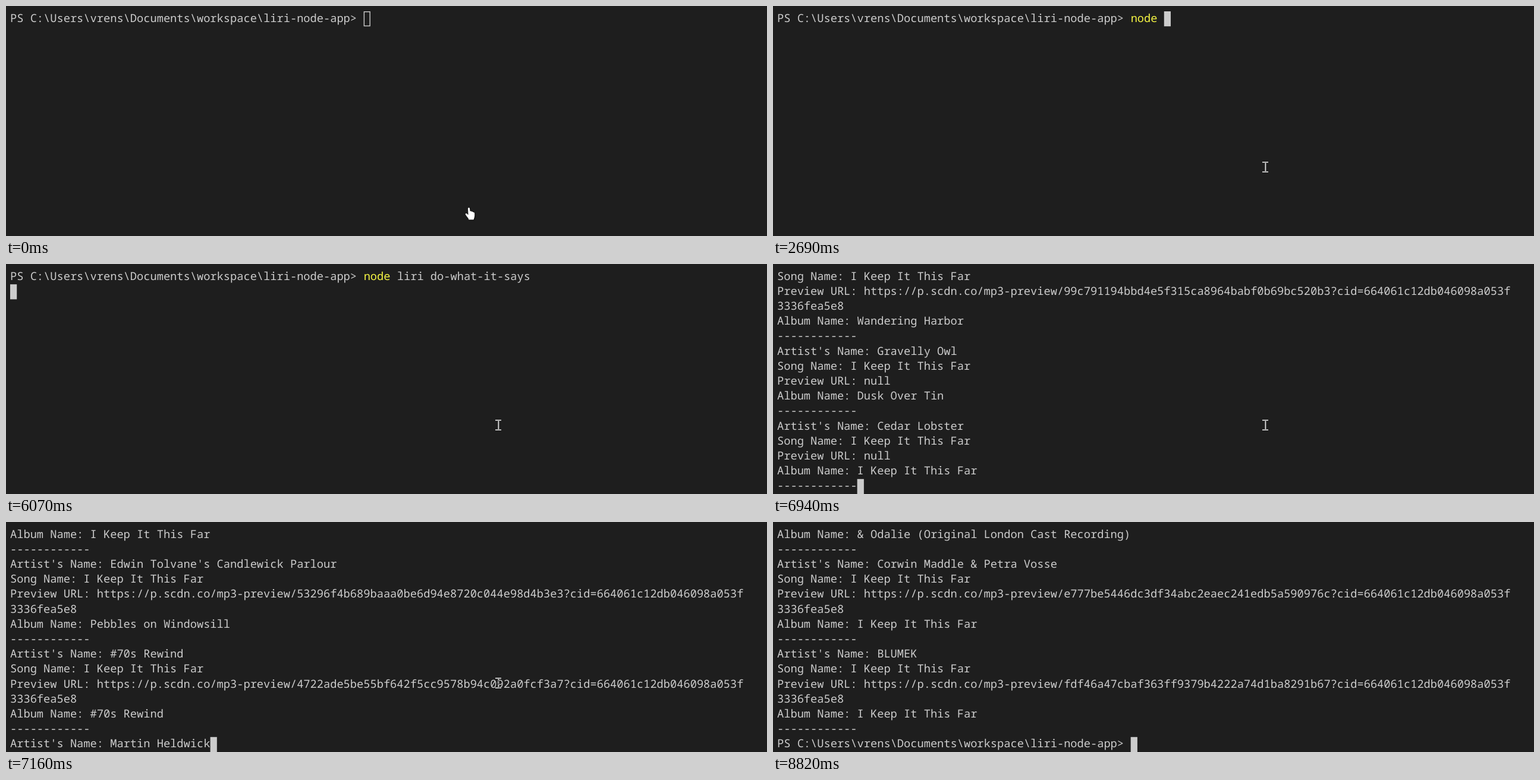
Recreate the animation shown at these times as an HTML page with a canvas. Size 1280x387 px, loop 9.36 s.

```html
<!DOCTYPE html>
<html lang="en">
<head>
<meta charset="utf-8">
<title>Terminal session</title>
<style>
  html, body { margin: 0; width: 100%; height: 100%; overflow: hidden; background: #1e1e1e; }
  canvas { display: block; }
</style>
</head>
<body>
<canvas id="stage" width="1280" height="387"></canvas>
<script>
const ctx = document.getElementById('stage').getContext('2d');
const LOOP = 9360, ROWS = 15, COLUMNS = 110;
const FONT_SIZE = 18.7, CELL = FONT_SIZE * 0.6;
const LEFT = 7, TOP = 9, ROW = 25.2, BASELINE = 17.5;
const FOREGROUND = '#cccccc', YELLOW = '#f5f543';

const PROMPT = 'PS C:\\Users\\vrens\\Documents\\workspace\\liri-node-app> ';
const COMMAND = 'node liri do-what-it-says';
const SONG = 'I Keep It This Far';
const ARTIST = "Artist's Name: ";

// artist, preview id, album
const tracks = [
  ['Nora Fenwell', '99c791194bbd4e5f315ca8964babf0b69bc520b3', 'Wandering Harbor'],
  ['Gravelly Owl', null, 'Dusk Over Tin'],
  ['Cedar Lobster', null, SONG],
  ['Velvet Inkwell', null, 'Paper Orchard'],
  ['Two Tin Kettles', null, SONG],
  ['The Marrow Lane', null, SONG],
  ["Edwin Tolvane's Candlewick Parlour", '53296f4b689baaa0be6d94e8720c044e98d4b3e3', 'Pebbles on Windowsill'],
  ['#70s Rewind', '4722ade5be55bf642f5cc9578b94c092a0fcf3a7', '#70s Rewind'],
  ['Martin Heldwick', null, '& Odalie (Original London Cast Recording)'],
  ['Corwin Maddle & Petra Vosse', 'e777be5446dc3df34abc2eaec241edb5a590976c', SONG],
  ['BLUMEK', 'fdf46a47cbaf363ff9379b4222a74d1ba8291b67', SONG],
];

function trackLines([artist, id, album]) {
  const url = id && `https://p.scdn.co/mp3-preview/${id}?cid=664061c12db046098a053f3336fea5e8`;
  const preview = `Preview URL: ${url}`;
  return [
    ARTIST + artist,
    `Song Name: ${SONG}`,
    preview.slice(0, COLUMNS),
    ...(url ? [preview.slice(COLUMNS)] : []),
    `Album Name: ${album}`,
    '-'.repeat(12),
  ];
}

const log = [...tracks.flatMap(trackLines), PROMPT];
const artistRow = i => log.indexOf(ARTIST + tracks[i][0]);
const logUntil = end => log.slice(end - ROWS, end);

// Each entry holds the visible lines from its time on.
const screens = [
  [0, [PROMPT]],
  [2690, [PROMPT + COMMAND.slice(0, 5)]],
  [3340, [PROMPT + COMMAND]],
  [6070, [PROMPT + COMMAND, '']],
  [6940, logUntil(artistRow(3))],
  [7060, logUntil(artistRow(5) + 1)],
  [7160, logUntil(artistRow(8) + 1)],
  [7290, logUntil(log.length)],
];

// Each entry holds the pointer's shape and position from its time on.
const pointers = [
  [0, drawHand, 772, 338],
  [100, drawBeam, 803, 308],
  [200, drawBeam, 828, 270],
  [1380, drawBeam, 828, 271],
  [8490, drawBeam, 793, 306],
  [8600, drawBeam, 759, 341],
  [8710, drawBeam, 724, 376],
  [8820, () => {}, 0, 0],
];

const current = (steps, time) => steps.findLast(step => step[0] <= time);

function drawText(text, column, row, color = FOREGROUND) {
  ctx.fillStyle = color;
  ctx.fillText(text, LEFT + column * CELL, TOP + row * ROW + BASELINE);
}

function drawLine(line, row) {
  if (!line.startsWith(PROMPT)) return drawText(line, 0, row);
  const command = line.slice(PROMPT.length);
  drawText(PROMPT, 0, row);
  drawText(command.slice(0, 4), PROMPT.length, row, YELLOW);
  drawText(command.slice(4), PROMPT.length + 4, row);
}

function drawCursor(column, row, focused) {
  const x = LEFT + column * CELL, y = TOP + row * ROW;
  ctx.fillStyle = ctx.strokeStyle = FOREGROUND;
  ctx.lineWidth = 1.4;
  if (focused) ctx.fillRect(x, y, CELL, ROW);
  else ctx.strokeRect(x + 0.7, y + 0.7, CELL - 1.4, ROW - 1.4);
}

function drawBeam(x, y) {
  ctx.globalCompositeOperation = 'difference';
  ctx.fillStyle = '#fff';
  ctx.fillRect(x - 5, y - 9, 10, 1.6);
  ctx.fillRect(x - 0.5, y - 7.4, 1.8, 14.8);
  ctx.fillRect(x - 5, y + 7.4, 10, 1.6);
}

function drawHand(x, y) {
  ctx.translate(x, y);
  ctx.shadowColor = 'rgba(0,0,0,.6)';
  ctx.shadowBlur = 2;
  ctx.shadowOffsetX = ctx.shadowOffsetY = 1;
  ctx.fillStyle = '#fff';
  ctx.fill(new Path2D(`M5 2.5 Q6.5 .2 8 2.5 L8.6 7.5 Q10 6.4 11 8 Q12.5 7.2 13.5 9
    Q16 8.6 16.2 11 V15 Q16 18 14.5 21.5 H6.5 Q5.5 18.5 3 16 L.8 12.8
    Q.4 10.5 2.6 11 L5.6 13.5 Z`));
}

function drawClick(x, y) {
  ctx.fillStyle = 'rgba(255,255,0,.47)';
  ctx.beginPath();
  ctx.arc(x, y, 12.5, 0, 2 * Math.PI);
  ctx.fill();
}

function draw(time) {
  ctx.fillStyle = '#1e1e1e';
  ctx.fillRect(0, 0, 1280, 387);
  ctx.font = `500 ${FONT_SIZE}px "Noto Sans Mono", monospace`;
  ctx.textRendering = 'geometricPrecision';

  const lines = current(screens, time)[1];
  lines.forEach(drawLine);
  drawCursor(lines.at(-1).length, lines.length - 1, time >= 1060);

  const [, drawPointer, x, y] = current(pointers, time);
  if (time >= 1060 && time < 1170) drawClick(x, y);
  ctx.save();
  drawPointer(x, y);
  ctx.restore();
}

const start = performance.now();
function tick() {
  draw((performance.now() - start) % LOOP);
  requestAnimationFrame(tick);
}
tick();
</script>
</body>
</html>
```
